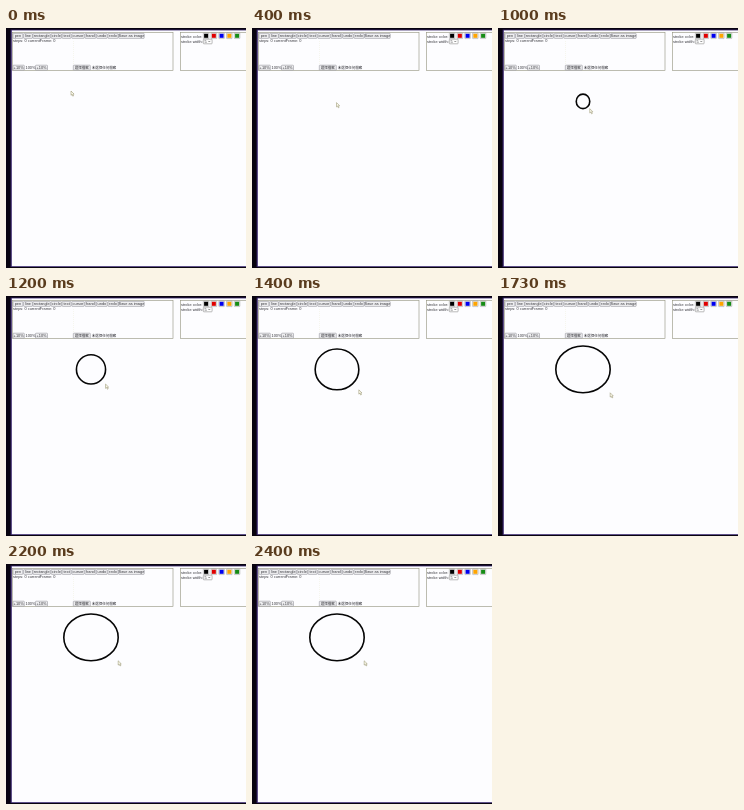
An HTML page that plays this animation: 240 by 240 pixels, repeating every 2470 ms.

```html
<!DOCTYPE html>
<html lang="en">
<head>
<meta charset="utf-8">
<title>Drawing board</title>
<style>
  html, body { margin: 0; width: 100%; height: 100%; overflow: hidden; background: #08030f; }
  svg { display: block; width: 100vw; height: 100vh; }
  text { font: 3.9px "Liberation Sans", Arial, sans-serif; fill: #34343a; }
  .cjk { font: 3.5px "Noto Sans CJK TC", "Noto Sans CJK", sans-serif; }
  .button text { text-anchor: middle; }
  .button rect { fill: #efeff1; stroke: #85858c; stroke-width: .5; }
  .panel { fill: none; stroke: #92927c; stroke-width: .6; }
</style>
</head>
<body>
<svg id="stage" viewBox="0 0 240 240">
  <rect width="240" height="240" fill="#08030f"/>
  <rect x="4.6" y="1.6" width="236" height="237.4" fill="#37256b"/>
  <rect x="5.8" y="2.4" width="235" height="235.8" fill="#fdfdff"/>
  <rect class="panel" x="6.5" y="4.5" width="160.5" height="38"/>
  <rect class="panel" x="174.3" y="4.5" width="70" height="38"/>
  <path d="M67.5 13V36" stroke="#eeeedc" stroke-width=".5" stroke-dasharray="1 1"/>
  <g id="tools"></g>
  <text x="7" y="14.4">steps: 0 currentFrame: 0</text>
  <text x="19.5" y="41">100%</text>
  <text class="cjk" x="85.8" y="41">未選擇任何檔案</text>
  <text x="175" y="9.6">stroke color:</text>
  <text x="175" y="14.8">stroke width:</text>
  <g id="colors"></g>
  <rect x="197.3" y="11.2" width="8.8" height="4.6" rx=".6" fill="#fff" stroke="#777" stroke-width=".5"/>
  <text x="198.6" y="14.9">5</text>
  <path d="M202.3 12.9l1 1.1 1-1.1" fill="none" stroke="#333" stroke-width=".5"/>
  <ellipse id="shape" cx="85" cy="73.4" fill="none" stroke="#060606" stroke-width="1.6"/>
  <path id="cursor" d="M0 0V4.3L1 3.4 1.8 5.2 2.6 4.8 1.8 3.1H3.1Z"
        fill="#fffdf0" stroke="#8c8862" stroke-width=".5"/>
</svg>
<script>
const byId = id => document.getElementById(id);

function add(parent, tag, attrs, text = '') {
  const node = document.createElementNS('http://www.w3.org/2000/svg', tag);
  for (const key in attrs) node.setAttribute(key, attrs[key]);
  node.textContent = text;
  parent.append(node);
  return node;
}

function button(label, x, y, width, textClass = '') {
  const group = add(byId('tools'), 'g', { class: 'button' });
  add(group, 'rect', { x, y, width, height: 5, rx: .6 });
  add(group, 'text', { x: x + width / 2, y: y + 3.8, class: textClass }, label);
}

[
  ['pen', 7, 9.8], ['line', 17.6, 8.8], ['rectangle', 27, 17.3],
  ['circle', 45.2, 10.2], ['text', 56.2, 8.8], ['cursor', 65.8, 12.4],
  ['hand', 79, 10.8], ['undo', 90.6, 10.6], ['redo', 102, 10],
  ['Save as image', 112.7, 25.5]
].forEach(([label, x, width]) => button(label, x, 5.4, width));
button('+10%', 7, 37.2, 11.3);
button('+10%', 29.5, 37.2, 12);
button('選擇檔案', 67.3, 37.2, 17, 'cjk');

['#000', '#e00000', '#0000f0', '#ffa500', '#168c16'].forEach((fill, i) => {
  const x = 197.3 + i * 7.75;
  add(byId('colors'), 'rect', {
    x, y: 5, width: 5.6, height: 5.6, rx: .5, fill: '#eee', stroke: '#888', 'stroke-width': .4
  });
  add(byId('colors'), 'rect', { x: x + .8, y: 5.8, width: 4, height: 4, fill });
});

const LOOP = 2470;
const STEP = LOOP / 37;
const DRAG_START = 800;

// time, pointer x, pointer y
const path = [
  [0, 65, 63], [70, 65.5, 63.3], [330, 84, 74.6], [470, 85, 74.6], [DRAG_START, 85, 73.4],
  [1000, 91.7, 80.6], [1200, 99.5, 88], [1400, 106.8, 93.8],
  [1670, 112.2, 96.8], [LOOP, 112.2, 96.8]
];

function pointer(t) {
  const next = path.findIndex(p => p[0] > t);
  const [t0, x0, y0] = path[next - 1];
  const [t1, x1, y1] = path[next];
  const k = (t - t0) / (t1 - t0);
  return [x0 + (x1 - x0) * k, y0 + (y1 - y0) * k];
}

function draw(now) {
  const t = Math.floor((now % LOOP) / STEP + .02) % 37 * STEP;
  const [x, y] = pointer(t);
  const shape = byId('shape');
  byId('cursor').setAttribute('transform', `translate(${x} ${y})`);
  shape.setAttribute('visibility', t > DRAG_START ? 'visible' : 'hidden');
  shape.setAttribute('rx', Math.max(0, x - 85));
  shape.setAttribute('ry', Math.max(0, y - 73.4));
}

const start = performance.now();
function tick() {
  draw(performance.now() - start);
  requestAnimationFrame(tick);
}
tick();
</script>
</body>
</html>
```
